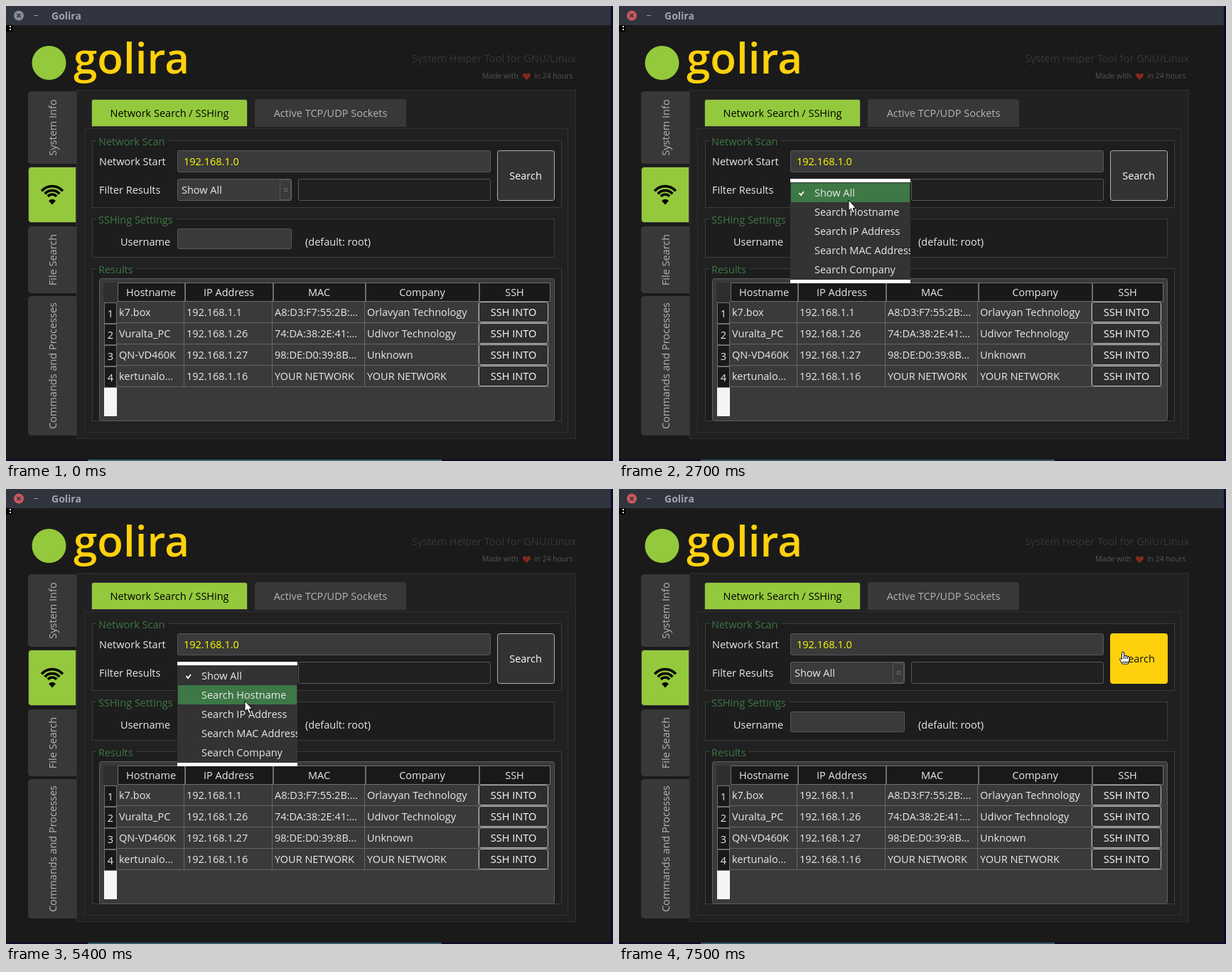
An HTML page for the animation above (8 s loop, 854 px wide and 640 px high).

```html
<!DOCTYPE html>
<html lang="en">
<head>
<meta charset="utf-8">
<title>Golira</title>
<style>
  html, body { margin: 0; width: 100%; height: 100%; overflow: hidden; background: #1a1a1a; }
  svg { display: block; width: 100vw; height: 100vh; }
  text { font: 14.5px "Open Sans", "Noto Sans", sans-serif; white-space: pre; }
</style>
</head>
<body>
<svg id="stage" viewBox="0 0 854 640"></svg>
<script>
const GREEN = '#94c93d', YELLOW = '#ffd10d', LEAF = '#3d7846', INK = '#e9e9e9', TAB = '#383838';

// Box from corner to corner; outlined boxes sit on the pixel grid.
function box(x1, y1, x2, y2, fill, line, r = 0, extra = '') {
  const o = line ? .5 : 0;
  return `<rect x="${x1 + o}" y="${y1 + o}" width="${x2 - x1 - 2 * o}" height="${y2 - y1 - 2 * o}" rx="${r}"
    fill="${fill}" stroke="${line || 'none'}" ${extra}/>`;
}
function text(x, y, s, fill = INK, extra = '') {
  return `<text x="${x}" y="${y}" fill="${fill}" ${extra}>${s}</text>`;
}
const mid = (x, y, s, fill, extra = '') => text(x, y, s, fill, 'text-anchor="middle" ' + extra);

function group(y1, x2, y2, title, gap) {
  return box(121, y1, x2, y2, '#1d1d1d', '#3c3c3c') + box(127, y1, gap, y1 + 1, '#1f1f1f') +
    text(130, y1 + 7, title, LEAF);
}

function sideTab(y1, y2, label) {
  const fill = label ? TAB : GREEN, cy = (y1 + y2) / 2;
  return `<path d="M98.5 ${y1 + .5}H35.5q-4 0 -4 4V${y2 - 4.5}q0 4 4 4H98.5z" fill="${fill}" stroke="${TAB}"/>` +
    (label ? mid(0, 0, label, '#b4b4b4', `transform="translate(71 ${cy}) rotate(-90)"`) : '');
}

function topTab(x1, x2, label, fill, ink) {
  return `<path d="M${x1 + .5} 169.500V134.500q0 -3 3 -3H${x2 - 3.5}q3 0 3 3V169.500z" fill="${fill}" stroke="${TAB}"/>` +
    mid((x1 + x2) / 2, 156, label, ink);
}

function wifi() {
  const arc = r => {
    const a = r * .76, b = r * .65;
    return `M${65 - a} ${273 - b}A${r} ${r} 0 0 1 ${65 + a} ${273 - b}`;
  };
  return `<path d="${[8, 13.5, 19.5].map(arc).join('')}" fill="none" stroke="#000" stroke-width="3.7"/>
    <path d="M65 279.500L60 274Q65 269.500 70 274z"/>`;
}

function table() {
  const cols = [157, 252, 376, 506, 666, 766];
  const heads = ['Hostname', 'IP Address', 'MAC', 'Company', 'SSH'];
  const rows = [
    ['k7.box', '192.168.1.1', 'A8:D3:F7:55:2B:…', 'Orlavyan Technology'],
    ['Vuralta_PC', '192.168.1.26', '74:DA:38:2E:41:…', 'Udivor Technology'],
    ['QN-VD460K', '192.168.1.27', '98:DE:D0:39:8B…', 'Unknown'],
    ['kertunalo…', '192.168.1.16', 'YOUR NETWORK', 'YOUR NETWORK']
  ];
  let s = box(131, 383, 772, 584, '#3a3a3a', '#5e5e5e', 3) + box(137, 389, 157, 416, '#2e2e2e');
  heads.forEach((h, i) => {
    s += box(cols[i], 389, cols[i + 1], 416, '#191919', '#6e6e6e') +
      mid((cols[i] + cols[i + 1] - 1) / 2, 408, h);
  });
  rows.forEach((row, i) => {
    const y = 416 + 30 * i;
    s += box(156, y + 29, 765, y + 30, '#666') + box(138, y + 1, 156, y + 31, '#191919', '#6e6e6e') +
      mid(147, y + 22, i + 1);
    row.forEach((c, j) => { s += text(cols[j] + 2, y + 20, c); });
    for (let j = 1; j < 5; j++) s += box(cols[j] - 2, y, cols[j] - 1, y + 30, '#666');
    s += box(665, y, 763, y + 29, '#2e2e2e', '#bdbdbd', 3) + mid(714, y + 20, 'SSH INTO', '#fff');
  });
  return s + box(138, 537, 156, 577, '#f5f5f5');
}

function popup() {
  const items = ['Show All', 'Search Hostname', 'Search IP Address', 'Search MAC Address', 'Search Company'];
  return `<g id="popup" clip-path="url(#clip)">` + box(241, 243, 410, 390, '#fff') +
    box(241, 248, 410, 385, '#333') + box(242, 0, 409, 27, LEAF, '', 0, 'id="row"') +
    items.map((s, i) => text(275, 268 + 27 * i, s)).join('') +
    `<path d="M253.5 263l2.5 3 4 -5" fill="none" stroke="#fff" stroke-width="1.8"/></g>`;
}

const stage = document.getElementById('stage');
stage.innerHTML = `<clipPath id="clip"><rect x="241" y="243" width="169" height="147"/></clipPath>` +
  box(0, 0, 854, 640, '#0f0a2c') + box(0, 27, 851, 638, '#1a1a1a') +
  // title bar
  box(0, 0, 851, 27, '#2f343f') +
  `<circle id="close" cx="18" cy="13.5" r="7"/>
   <path d="M15.5 11l5 5m0 -5l-5 5" stroke="#2f343f" stroke-width="1.6"/>` +
  box(39, 13, 45, 14, '#9a9ea6') +
  text(64, 19, 'Golira', '#a0a4ac', 'style="font-weight:700;font-size:14px"') +
  box(0, 27, 9, 36, '#000') + box(5, 28, 7, 30, '#fff') + box(5, 32, 7, 34, '#fff') +
  box(115, 638, 613, 640, '#000', '', 0, 'id="strip"') +
  // heading
  `<circle cx="60.5" cy="80" r="24" fill="${GREEN}"/>` +
  text(95, 95, 'golira', YELLOW, 'style="font-size:60px;font-weight:600"') +
  text(571, 79, 'System Helper Tool for GNU/Linux', '#373737') +
  text(670, 102, 'Made with', '#555', 'style="font-size:10.4px"') +
  text(743, 102, 'in 24 hours', '#555', 'style="font-size:10.4px"') +
  `<path d="M732.5 104l-5 -5q-1.500 -4 2 -4.500 2 0 3 2 1 -2 3 -2 3.500 .5 2 4.500z" fill="#84291d"/>` +
  // tabs and panes
  box(99, 118, 802, 609, '#212121', '#303030') +
  sideTab(120, 222, 'System Info') + sideTab(226, 305) + wifi() +
  sideTab(310, 404, 'File Search') + sideTab(408, 604, 'Commands and Processes') +
  box(110, 172, 791, 600, '#212121', '#303030') +
  topTab(120, 340, 'Network Search / SSHing', GREEN, '#000') +
  topTab(350, 563, 'Active TCP/UDP Sockets', TAB, '#b4b4b4') +
  // forms
  group(189, 782, 284, 'Network Scan', 228) +
  text(131, 224, 'Network Start') + box(241, 203, 682, 234, '#3a3a3a', '#585858', 2) +
  text(250, 224, '192.168.1.0', '#ff0') +
  text(131, 264, 'Filter Results') + box(241, 243, 402, 274, '#3a3a3a', '#606060', 2) +
  box(385, 244, 401, 273, '#3a3a3a', '#555', 2) + box(391, 256, 396, 261, 'none', '#686868') +
  text(247, 264, 'Show All') + box(411, 243, 682, 274, '#202020', '#585858', 2) +
  box(691, 203, 772, 274, '#333', '#b0b0b0', 3, 'id="button"') + mid(731, 244, 'Search', '#fff', 'id="label"') +
  group(299, 772, 354, 'SSHing Settings', 240) +
  text(161, 337, 'Username') + box(241, 313, 402, 342, '#3a3a3a', '#585858', 2) +
  text(421, 337, '(default: root)') +
  group(369, 782, 584, 'Results', 183) + table() + popup() +
  // pointers, hot spot at 0,0
  `<g id="pointer" stroke="#000" stroke-linejoin="round">
    <path id="arrow" fill="#fff" d="M0 0V15L3.400 12 6 18 8.600 17 6.200 11.300H10.500z"/>
    <path id="beam" fill="none" stroke="#ddd" d="M-3 -8H3M0 -8V8M-3 8H3"/>
    <g id="hand"><path fill="#fff" d="M-1.500 0Q0 -1.500 1.500 0V4.500Q3 3.500 4 5 5.500 4 6.500 5.500 9 4.500 9 7.500V11L7.500 16H-1L-4.500 9.500Q-4.500 7.500 -2.500 8.500L-1.500 9.500z"/>
    <path fill="none" d="M1.500 5V9M4 5.500V9M6.500 6V9M-1 13.500H8"/></g></g>`;

// time, x, y of the pointer
const path = [
  [500, 13, 295], [800, 150, 289], [1100, 267, 273], [1200, 301, 264], [1300, 327, 258],
  [2600, 326, 258], [2700, 323, 273], [3000, 325, 284], [3200, 325, 284], [3500, 329, 308],
  [3600, 330, 311], [3700, 330, 311], [4000, 337, 340], [4100, 337, 340], [4400, 345, 372],
  [4900, 345, 372], [5600, 333, 268], [6300, 333, 268], [6600, 420, 270], [7000, 635, 252],
  [7200, 683, 238], [7300, 697, 234], [7500, 709, 230], [8000, 709, 230]
];

function place(t) {
  const i = Math.max(1, path.findIndex(p => p[0] >= t));
  const [t0, x0, y0] = path[i - 1], [t1, x1, y1] = path[i];
  const k = (t - t0) / (t1 - t0);
  return [Math.round(x0 + (x1 - x0) * k), Math.round(y0 + (y1 - y0) * k)];
}

function pointerKind(x, y, t) {
  if (t >= 1900 && t < 6000) return 'arrow';
  if (x >= 691 || (x > 241 && x < 402 && y < 272)) return 'hand';
  return x > 411 && x < 682 && y > 243 && y < 274 ? 'beam' : 'arrow';
}

const el = id => document.getElementById(id);
const set = (id, name, value) => el(id).setAttribute(name, value);
const show = (id, on) => set(id, 'visibility', on ? 'visible' : 'hidden');

function draw(time) {
  const t = Math.floor(time % 8000 / 100) * 100;
  const [x, y] = place(Math.max(t, 500));
  const kind = pointerKind(x, y, t), active = t >= 1900, hot = t >= 7300;
  for (const k of ['arrow', 'beam', 'hand']) show(k, t >= 500 && k === kind);
  set('pointer', 'transform', `translate(${x} ${y})`);
  set('popup', 'opacity', t < 1900 || t > 6000 ? 0 : t < 2000 ? .5 : t < 6000 ? 1 : .25);
  set('row', 'y', 249 + 27 * Math.max(0, Math.min(4, Math.floor((y - 249) / 27))));
  set('close', 'fill', active ? '#cc575d' : '#888b92');
  set('strip', 'fill', active ? '#34566c' : '#44687a');
  set('button', 'fill', hot ? YELLOW : '#333');
  set('button', 'stroke', hot ? YELLOW : '#b0b0b0');
  set('label', 'fill', hot ? '#111' : '#fff');
}

function tick() {
  draw(performance.now());
  requestAnimationFrame(tick);
}
tick();
</script>
</body>
</html>
```
